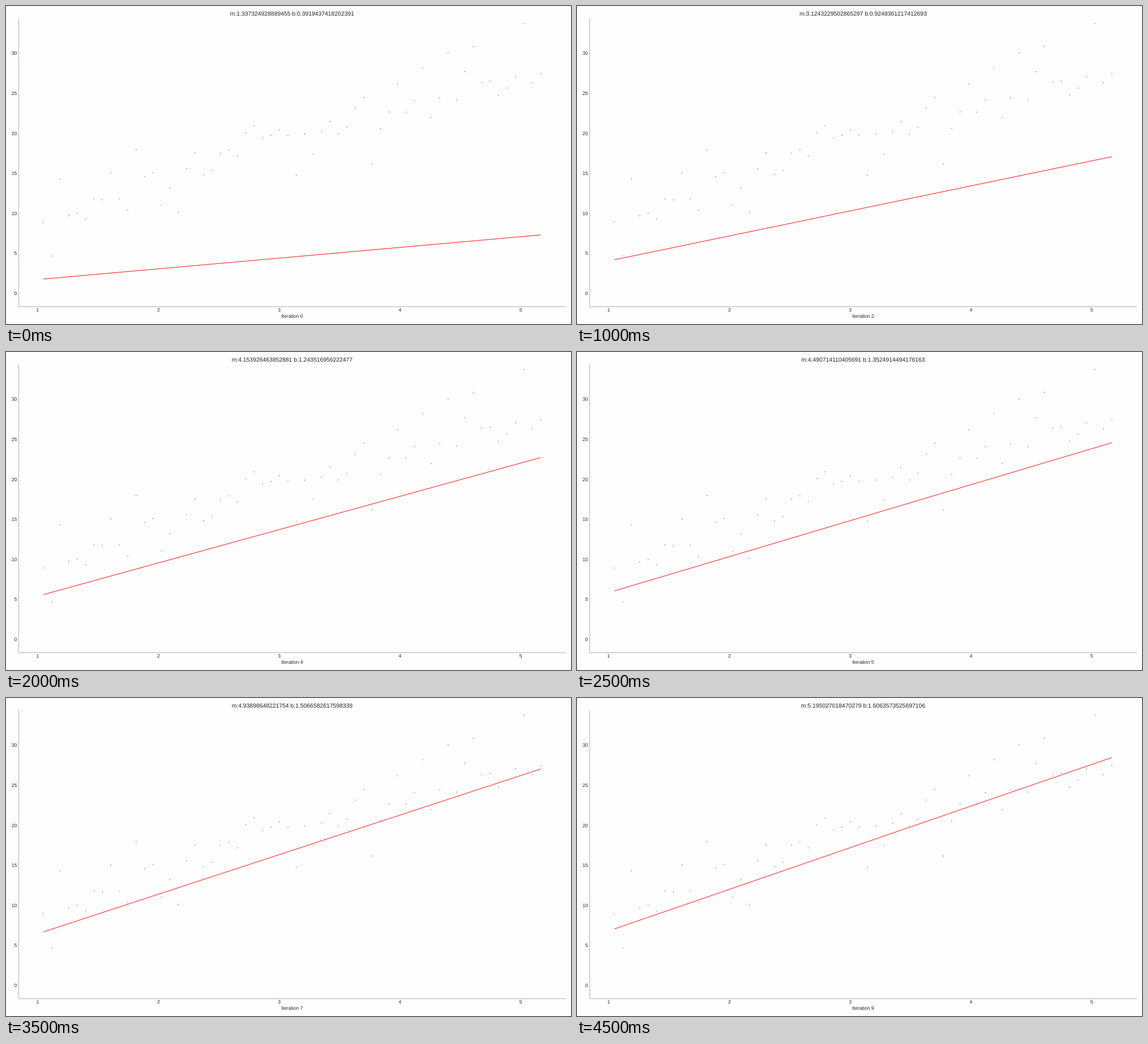
Animation, 998 px wide and 561 px high, one loop 5 s. Source, as an HTML page:

```html
<!DOCTYPE html>
<html lang="en">
<head>
<meta charset="utf-8">
<title>Gradient descent fit</title>
<style>
  html, body { margin: 0; width: 100%; height: 100%; overflow: hidden; background: #fefefe; }
  svg { display: block; width: 998px; height: 561px; }
  text {
    font: 8.66px "Liberation Sans", Arial, sans-serif;
    fill: #262626;
    text-anchor: middle;
    text-rendering: geometricPrecision;
  }
  .title { font-size: 10.39px; }
  .y { text-anchor: end; }
</style>
</head>
<body>
<svg id="plot" viewBox="0 0 998 561"></svg>
<script>
const plot = document.getElementById('plot');

function add(tag, attrs, text = '') {
  const el = document.createElementNS('http://www.w3.org/2000/svg', tag);
  for (const name in attrs) el.setAttribute(name, attrs[name]);
  el.textContent = text;
  plot.appendChild(el);
  return el;
}

const px = x => 56 + 213.3 * (x - 1);
const py = y => 507 - 14.13 * y;

// Samples every 4 degrees from 60 to 296
const count = 60;
const xs = Array.from({ length: count }, (_, i) => (60 + 4 * i) * Math.PI / 180);
const x0 = xs[0];
const x1 = xs[count - 1];

// Seeded generator for the scatter around the trend
let seed = 10;
function random() {
  seed = (seed * 1664525 + 1013904223) % 4294967296;
  return seed / 4294967296;
}
const noise = () => 5 * (random() + random() + random() - 1.5);
const sample = x => 6.55 + 4.2 * x + noise();

// Gradient descent on the squared error, starting from m = b = 0
const mean = list => list.reduce((sum, v) => sum + v, 0) / list.length;
const rate = 0.02;
const meanX = mean(xs);
const meanXX = mean(xs.map(x => x * x));
const first = [1.337324928889455, 0.3919437418202391];
const step = ([m, b]) => [
  m - rate * (meanXX * m + meanX * b) + first[0],
  b - rate * (meanX * m + b) + first[1]
];
const fits = [first];
while (fits.length < 10) fits.push(step(fits[fits.length - 1]));

add('path', { d: 'M22.5 22V530.5H989', fill: 'none', stroke: '#b0b0b0' });
for (let x = 1; x <= 5; x++) add('text', { x: px(x), y: 539.1 }, x);
for (let y = 0; y <= 30; y += 5) add('text', { class: 'y', x: 19.3, y: py(y) + 3.1 }, y);
for (const x of xs) add('circle', { cx: px(x), cy: py(sample(x)), r: 0.85, fill: '#808080' });

const line = add('line', { x1: px(x0), x2: px(x1), stroke: '#f00', 'stroke-width': 0.95 });
const title = add('text', { class: 'title', x: 505.4, y: 16.9 });
const label = add('text', { x: 505.4, y: 550 });

function draw(time) {
  const k = Math.floor(time / 500) % fits.length;
  const [m, b] = fits[k];
  line.setAttribute('y1', py(m * x0 + b));
  line.setAttribute('y2', py(m * x1 + b));
  title.textContent = `m:${m} b:${b}`;
  label.textContent = `Iteration ${k}`;
}

const start = performance.now();
function tick() {
  draw(performance.now() - start);
  requestAnimationFrame(tick);
}
tick();
</script>
</body>
</html>
```
